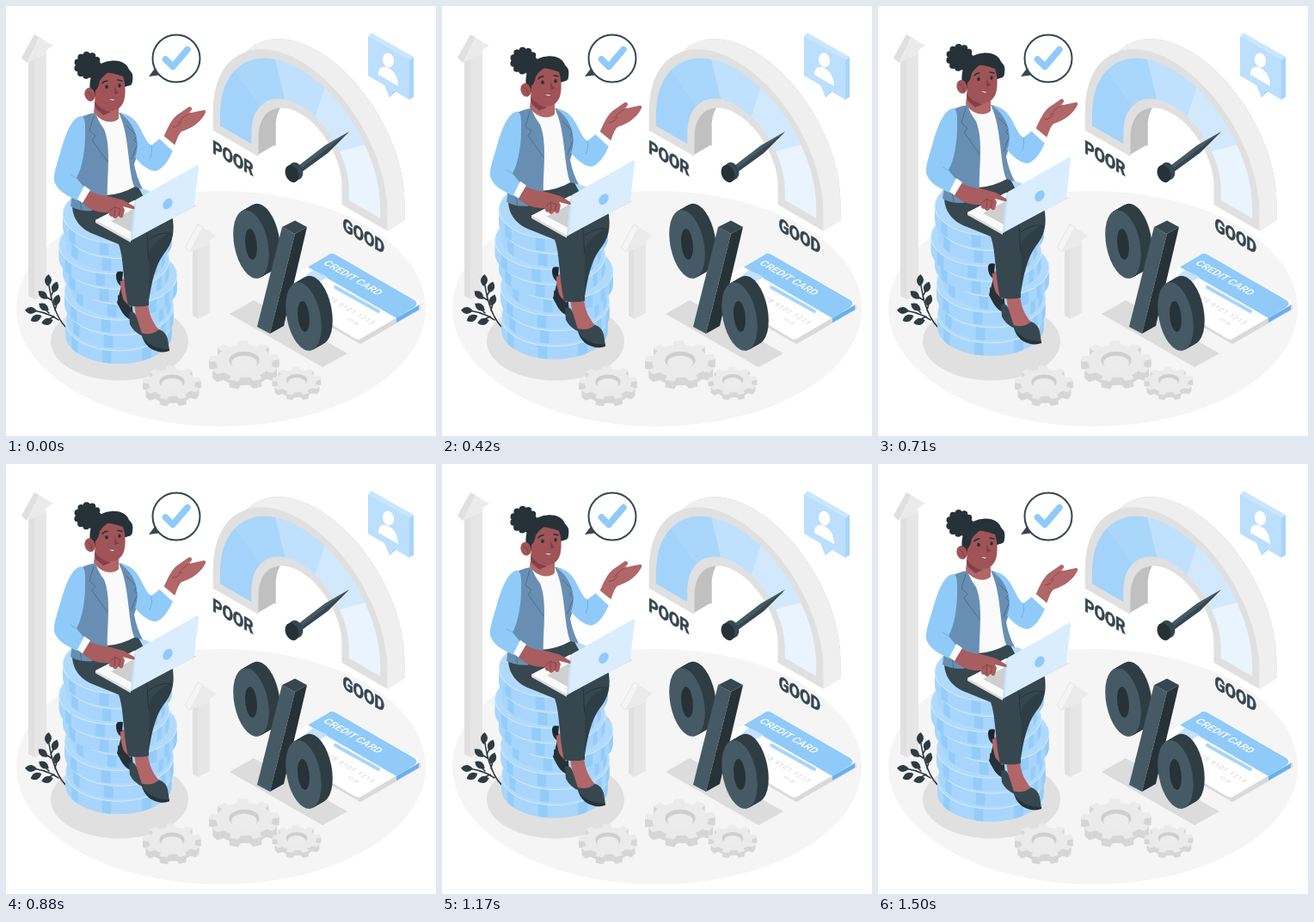
Write an HTML page that moves like this. It is 500x500 px and loops after 1540 ms.

```html
<!DOCTYPE html>
<html lang="en">
<head>
<meta charset="utf-8">
<title>Credit score</title>
<style>
  html, body { margin: 0; height: 100%; overflow: hidden; background: #fff; }
  svg { display: block; width: 100vw; height: 100vh; }
  text { font-family: Roboto, Inter, sans-serif; font-weight: 700; }
  .line { fill: none; stroke-linecap: round; stroke-linejoin: round; }
  .digits text { font-weight: 400; }
</style>
</head>
<body>
<svg viewBox="0 0 500 500">
  <ellipse cx="250" cy="352" rx="238" ry="137" fill="#f5f5f5"/>

  <!-- arrows -->
  <g>
    <path d="M26 56H35V342L26 337Z" fill="#e0e0e0"/>
    <path d="M33 60L47 52V335L33 341Z" fill="#e6e6e6"/>
    <path d="M18 60L33 33L39 36L24 66Z" fill="#e0e0e0"/>
    <path d="M24 66L39 36L33 33L55 46L47 51V56Z" fill="#ebebeb"/>
  </g>
  <g>
    <path d="M217 278H224V364L217 360Z" fill="#e0e0e0"/>
    <path d="M223 282L237 274V357L223 364Z" fill="#e6e6e6"/>
    <path d="M208 281L223 254L229 257L214 286Z" fill="#f5f5f5" stroke="#e0e0e0" stroke-width=".8"/>
    <path d="M214 286L229 257L223 254L245 267L237 273V277Z" fill="#ebebeb"/>
  </g>

  <ellipse cx="132" cy="390" rx="80" ry="45.500" fill="#e0e0e0"/>

  <!-- gauge -->
  <g transform="matrix(.866 .5 0 1 362 191)">
    <path d="M-117 0V-22A117 117 0 0 1 117 -22V0H56V-22A56 56 0 0 0 -56 -22V0Z" fill="#c0c0c0"/>
    <path d="M-117 -22A117 117 0 0 1 117 -22V0L93 25V-10A117 117 0 0 0 -117 -50Z" fill="#efefef"/>
  </g>
  <path d="M293 173L313.500 161V139L293 150Z" fill="#c0c0c0"/>
  <path d="M443 262L463 250V222L443 235Z" fill="#efefef"/>
  <g transform="matrix(.866 .5 0 1 342 203)">
    <path d="M-117 0V-22A117 117 0 0 1 117 -22V0H56V-22A56 56 0 0 0 -56 -22V0Z" fill="#e0e0e0"/>
    <g id="segments"></g>
  </g>
  <path d="M337 188L371 162L399 146L374 171L341 195Z" fill="#455a64"/>
  <path d="M339 192L399 146L374 171L341 195Z" fill="#37474f"/>
  <ellipse cx="337" cy="192" rx="8" ry="10.500" fill="#37474f" transform="rotate(-22 337 192)"/>
  <ellipse cx="332.500" cy="195" rx="7.500" ry="10.500" fill="#263238" transform="rotate(-22 332.500 195)"/>
  <g font-size="21" letter-spacing="-.3" fill="#37474f" stroke="#37474f" stroke-width=".6">
    <text transform="matrix(.866 .5 0 1 240 170.500)">POOR</text>
    <text transform="matrix(.866 .5 0 1 391.500 260.500)">GOOD</text>
  </g>

  <!-- user badge -->
  <path d="M421 36L425 31.500L474 59.500V106L468 109Z" fill="#a6d5fa"/>
  <path d="M421 36L425 31.500L474 59.500L469 63Z" fill="#c9e6fd"/>
  <path d="M441 93L446 106L454 99Z" fill="#90caf9"/>
  <path d="M421 36L469 63V109L452 99L446 106L440 92L421 81Z" fill="#bbdffc"/>
  <ellipse cx="444.500" cy="63" rx="6.500" ry="8.500" fill="#fff" transform="rotate(-12 444.500 63)"/>
  <path d="M433 80C433 70 440 69 446 73C452 76 456 84 456 93Z" fill="#fff"/>

  <!-- credit card -->
  <path d="M308 333L378 290L482 348V353L412 393Z" fill="#d9d9d9"/>
  <path d="M308 328L374 290Q378 286 383 289L477 342Q482 346 477 349L414 386Q410 389 405 386Z" fill="#fff"/>
  <path d="M454 363L480 348V353L454 368Z" fill="#64b0f0"/>
  <path d="M351 303.500L374 290Q378 286 383 289L475 342Q480 346 475 350L454 363Z" fill="#90caf9"/>
  <path d="M344 317L357 307L374 315L359 324Z" fill="#c3e2fd"/>
  <path d="M383 327L433 355" class="line" stroke="#a6d5fa" stroke-width="4"/>
  <text transform="matrix(.866 .5 -.866 .5 368 299.500)" font-size="12" fill="#fff" style="font-weight:500">CREDIT CARD</text>
  <g class="digits" fill="#d2d2d2" text-anchor="end">
    <text transform="matrix(.866 .5 -.866 .5 426 371)" font-size="8" letter-spacing="1">5678 9101 1213</text>
    <text transform="matrix(.866 .5 -.866 .5 408 371)" font-size="5">02/28</text>
  </g>

  <!-- percent sign -->
  <path d="M260 358L288 342L397 404L368 420Z" fill="#dcdcdc"/>
  <g id="leftZero"></g>
  <path d="M321 257L336 265L307 381L292 373Z" fill="#455a64"/>
  <path d="M321 257L336 249.500L350 257L336 265Z" fill="#37474f"/>
  <path d="M336 265L350 257L323 372L307 381Z" fill="#263238"/>
  <g id="rightZero"></g>

  <g id="gears"></g>

  <!-- speech bubble -->
  <path d="M166 82L175 70L181 80Z" fill="#37474f"/>
  <circle cx="198" cy="61" r="27.500" fill="#fff" stroke="#37474f" stroke-width="2"/>
  <path d="M185.500 62L194 70.500L211 50.500" class="line" stroke="#90caf9" stroke-width="7.500"/>

  <!-- plant -->
  <path d="M70 374Q54 358 49 318M61 365Q45 354 26 354M53 342L43 336M57 354L60 342M50 357L43 350M56 361L44 367M52 338L57 327" class="line" stroke="#263238" stroke-width="1.500"/>
  <g id="leaves" fill="#2d3c43"></g>

  <g id="rise">
    <g id="coins"></g>

    <!-- rear foot -->
    <path d="M130 308C126 316 129 322 134 326L129 345C135 357 141 364 148 366L147 350L137 325Z" fill="#263238"/>
    <path d="M133 318L142 317L147 348L142 352C136 343 133 333 133 318Z" fill="#b16668"/>
    <path d="M130 336C136 340 142 348 147 353L148 366C138 363 130 353 130 336Z" fill="#263238"/>
    <path d="M128 312Q130 307 136 309L135 320Q128 319 128 312Z" fill="#1c262b"/>

    <!-- legs -->
    <path d="M160 262L193 243C197 262 194 276 183 289C174 301 169 322 166 343L150 343Z" fill="#2f3e45"/>
    <path d="M149 345H165C166 359 171 370 182 381L160 388C156 378 151 365 149 345Z" fill="#b16668"/>
    <path d="M143 357Q149 353 152 362L159 384Q148 379 144 370Z" fill="#37474f"/>
    <path d="M157 380Q169 384 178 376Q186 379 188 387L190 400Q180 405 168 398Q159 391 157 380Z" fill="#37474f"/>
    <path d="M159 386Q170 399 190 399V401Q180 405 168 398Q162 394 159 386Z" fill="#263238"/>
    <path d="M77 231C77 248 87 260 104 266L131 277C137 292 136 322 142 348Q154 351 166 348C166 330 166 302 166 290C169 275 184 268 194 262L192 242L160 222L152 207L118 217Z" fill="#37474f"/>
    <path d="M166 294C164 279 166 268 162 259M166 272Q178 263 190 264" class="line" stroke="#263238" stroke-width="1"/>

    <!-- torso -->
    <path d="M103 124L133 126C144 145 149 180 150 210Q134 219 117 220L100 160Z" fill="#fafafa"/>
    <path d="M104 107L131 112V131C124 138 109 135 102 123Z" fill="#b16668"/>
    <path d="M104 124C94 126 87 128 84 133L82 180L75 233Q85 239 100 238L118 222C117 200 123 165 114 143Q107 134 104 124Z" fill="#688fb3"/>
    <path d="M102 128L97 145L104 151L100 156L118 181M83 205L88 238" class="line" stroke="#44677f" stroke-width=".8"/>
    <path d="M131 124C148 126 156 145 156 163L149 184Q152 200 159 213L149 210C141 188 144 150 131 124Z" fill="#688fb3"/>
    <path d="M140 139L152 151L149 156L153 160L146 178" class="line" stroke="#44677f" stroke-width=".8"/>

    <!-- raised arm -->
    <path d="M182 155C188 143 191 131 203 124L213 117Q219 118 214 123L211 125L230 121Q234 121 231 126C224 138 213 143 204 146C199 151 198 159 194 167Z" fill="#b16668"/>
    <path d="M214 124Q204 130 200 136M194 141Q202 140 204 134" class="line" stroke="#8d4548" stroke-width="1"/>
    <path d="M133 125C147 126 153 136 158 146C162 154 165 160 169 162L182 152L194 168C189 181 180 192 173 192C164 191 155 182 150 176C156 163 153 138 133 125Z" fill="#90caf9"/>
    <path d="M181 149L198 163Q198 167 193 168L179 155Z" fill="#fff"/>
    <path d="M169 162Q171 171 167 178" class="line" stroke="#64a9df" stroke-width=".8"/>

    <!-- laptop -->
    <path d="M104 249L149 226L222 232L145 272V275L104 252Z" fill="#dcdcdc"/>
    <path d="M104 249L149 226L215 232L145 272Z" fill="#fafafa"/>
    <path d="M122 250L148 236V264Z" fill="#cfcfcf"/>
    <path d="M149 229Q149 226 153 224L222 185Q224 184 224 188L219 231Q218 234 215 235L145 273Z" fill="#d9edfe"/>
    <path d="M149 229L145 273L147 272L151 229Z" fill="#c1e1fb"/>
    <ellipse cx="188" cy="230" rx="5" ry="7" fill="#90caf9" transform="rotate(35 188 230)"/>

    <!-- typing arm -->
    <path d="M91 213C102 217 110 221 119 221L137 226L149 233Q151 237 147 236L136 233L138 237L136 245Q133 248 131 244Q127 250 124 245Q119 245 120 240C110 241 97 238 88 228Z" fill="#a85d5f"/>
    <path d="M121 238L127 233L126 244M127 234L133 236L131 244" class="line" stroke="#7f3e42" stroke-width=".8"/>
    <path d="M88 128C77 128 69 149 63 171C57 190 54 201 57 206C61 216 74 222 83 226L91 211L82 200C89 188 92 165 92 152C92 141 93 130 88 128Z" fill="#90caf9"/>
    <path d="M91 209L98 214L89 229L83 225Z" fill="#fff"/>
    <path d="M82 200L75 196" class="line" stroke="#64a9df" stroke-width=".8"/>

    <!-- head -->
    <circle cx="95" cy="69" r="12" fill="#263238" stroke="#263238" stroke-width="8" stroke-linecap="round" stroke-dasharray="0 6.850"/>
    <path d="M98 100C95 79 106 65 121 64C132 62 141 67 143 74C149 79 148 84 145 92L132 96L108 110Z" fill="#263238"/>
    <path d="M104 98L111 77Q123 77 136 82C140 93 139 107 136 113C131 123 121 123 115 121L103 115Z" fill="#a05457"/>
    <path d="M103 111Q110 121 122 123L113 127L104 119Z" fill="#83404a"/>
    <ellipse cx="97.500" cy="103" rx="6" ry="8" fill="#a05457" transform="rotate(-15 97.500 103)"/>
    <path d="M95 100Q100 102 100 108" class="line" stroke="#7f3e42" stroke-width="1"/>
    <path d="M102 100Q108 96 109 87Q114 79 122 76Q132 76 137 82Q142 85 141 89Q144 92 144 89Q147 91 145 94Q148 88 147 82Q144 72 135 68L116 68L102 79Z" fill="#263238"/>
    <path d="M126 91Q127 99 132 101L126 103Z" fill="#83404a"/>
    <ellipse cx="117" cy="94" rx="1.800" ry="2.300" fill="#263238"/>
    <ellipse cx="132" cy="92.500" rx="1.700" ry="2.300" fill="#263238"/>
    <path d="M112 90Q114 87 118 87M130 86L135 87" class="line" stroke="#263238" stroke-width="1.500"/>
    <path d="M119 107Q123 109 127 108Q124 113 119 107Z" fill="#fff" stroke="#7f3e42" stroke-width=".7"/>
  </g>
</svg>
<script>
const LOOP = 1540, LIFT = 9.2;
const $ = id => document.getElementById(id);
const polar = (r, deg, cx = 0, cy = 0, squash = 1) => {
  const a = deg * Math.PI / 180;
  return `${(cx + r * Math.cos(a)).toFixed(2)} ${(cy + r * squash * Math.sin(a)).toFixed(2)}`;
};
const shape = (d, fill) => `<path d="${d}" fill="${fill}"/>`;

// Gauge segments: five wedges of 36 degrees, with straight feet at both ends
const OUTER = 107.5, INNER = 65.5;
$('segments').innerHTML = ['#a3d3fa', '#a9d6fb', '#bfe1fd', '#d2e9fd', '#e9f4fe'].map((fill, i) => {
  const from = 180 + i * 36, to = from + 36, point = (r, a) => polar(r, a, 0, -22);
  const foot = side => `M${side * OUTER} -10H${side * INNER}V-22H${side * OUTER}Z`;
  const arc = `M${point(OUTER, from)}A${OUTER} ${OUTER} 0 0 1 ${point(OUTER, to)}` +
    `L${point(INNER, to)}A${INNER} ${INNER} 0 0 0 ${point(INNER, from)}Z`;
  return shape(arc + (i === 0 ? foot(-1) : i === 4 ? foot(1) : ''), fill);
}).join('');

// Extruded zero of the percent sign
function zero(id, x, y) {
  const oval = (dx, dy, rx, ry, fill) =>
    `<ellipse rx="${rx}" ry="${ry}" fill="${fill}" transform="matrix(.866 .5 0 1 ${x + dx} ${y + dy})"/>`;
  let out = '';
  for (let k = 13; k > 0; k--) out += oval(k, -k * .57, 24, 38, '#2f3d44');
  $(id).innerHTML = out + oval(0, 0, 24, 38, '#455a64') + oval(0, 0, 8, 17.5, '#263238');
}
zero('leftZero', 285, 277);
zero('rightZero', 346, 361);

// Gear lying on the floor, built from stacked toothed outlines
function gear(cx, cy, r, depth) {
  const teeth = 9, step = 360 / teeth;
  const outline = y => {
    const points = [];
    for (let i = 0; i < teeth; i++)
      for (const [k, scale] of [[0, .8], [.22, .8], [.3, 1], [.68, 1], [.76, .8]])
        points.push(polar(r * scale, (i + k) * step + 8, cx, y, .58));
    return `M${points.join('L')}Z`;
  };
  let out = '';
  for (let k = depth; k > 0; k--) out += shape(outline(cy + k), '#d6d6d6');
  const oval = (y, rx, fill) => `<ellipse cx="${cx}" cy="${y}" rx="${rx}" ry="${rx * .58}" fill="${fill}"/>`;
  return out + shape(outline(cy), '#ebebeb') + oval(cy - 1, r * .43, '#cfcfcf') + oval(cy + 2, r * .36, '#ececec');
}
$('gears').innerHTML = gear(193, 438, 34, 8) + gear(277, 413, 41, 9) + gear(338, 436, 28.5, 6);

// Leaves: x, y, angle
$('leaves').innerHTML = [[49, 319, 5], [43, 336, -50], [57, 327, 20], [59, 342, 20], [44, 350, -55],
  [29, 354, -85], [35, 363, 65], [48, 367, 75]]
  .map(([x, y, a]) => `<path d="M0 7Q-8 0 0 -7Q8 0 0 7Z" transform="translate(${x} ${y}) rotate(${a})"/>`).join('');

// Coin stack, bottom first
const RX = 62, RY = 34, THICK = 15;
function coin(cx, cy) {
  const wall = (from, to, fill) => {
    const at = (a, dy) => polar(RX, a, cx, cy + dy, RY / RX);
    return shape(`M${at(from, 0)}A${RX} ${RY} 0 0 1 ${at(to, 0)}L${at(to, THICK)}A${RX} ${RY} 0 0 0 ${at(from, THICK)}Z`, fill);
  };
  let out = wall(0, 180, '#a8d5fb');
  for (const [from, to] of [[8, 22], [32, 40], [52, 64], [98, 108], [140, 152]])
    out += wall(from, to, '#94ccf9');
  return out + `<ellipse cx="${cx}" cy="${cy}" rx="${RX}" ry="${RY}" fill="#b0dafb" stroke="#dceefe" stroke-width=".8"/>`;
}
$('coins').innerHTML = [131, 133, 130, 137, 128, 123.5, 131, 128]
  .map((cx, i) => coin(cx, 367 - i * 17.9)).join('');

function draw(now) {
  const phase = now % LOOP / LOOP;
  const y = -LIFT * (1 - Math.cos(2 * Math.PI * phase)) / 2;
  $('rise').setAttribute('transform', `translate(0 ${y.toFixed(3)})`);
  requestAnimationFrame(draw);
}
requestAnimationFrame(draw);
</script>
</body>
</html>
```
